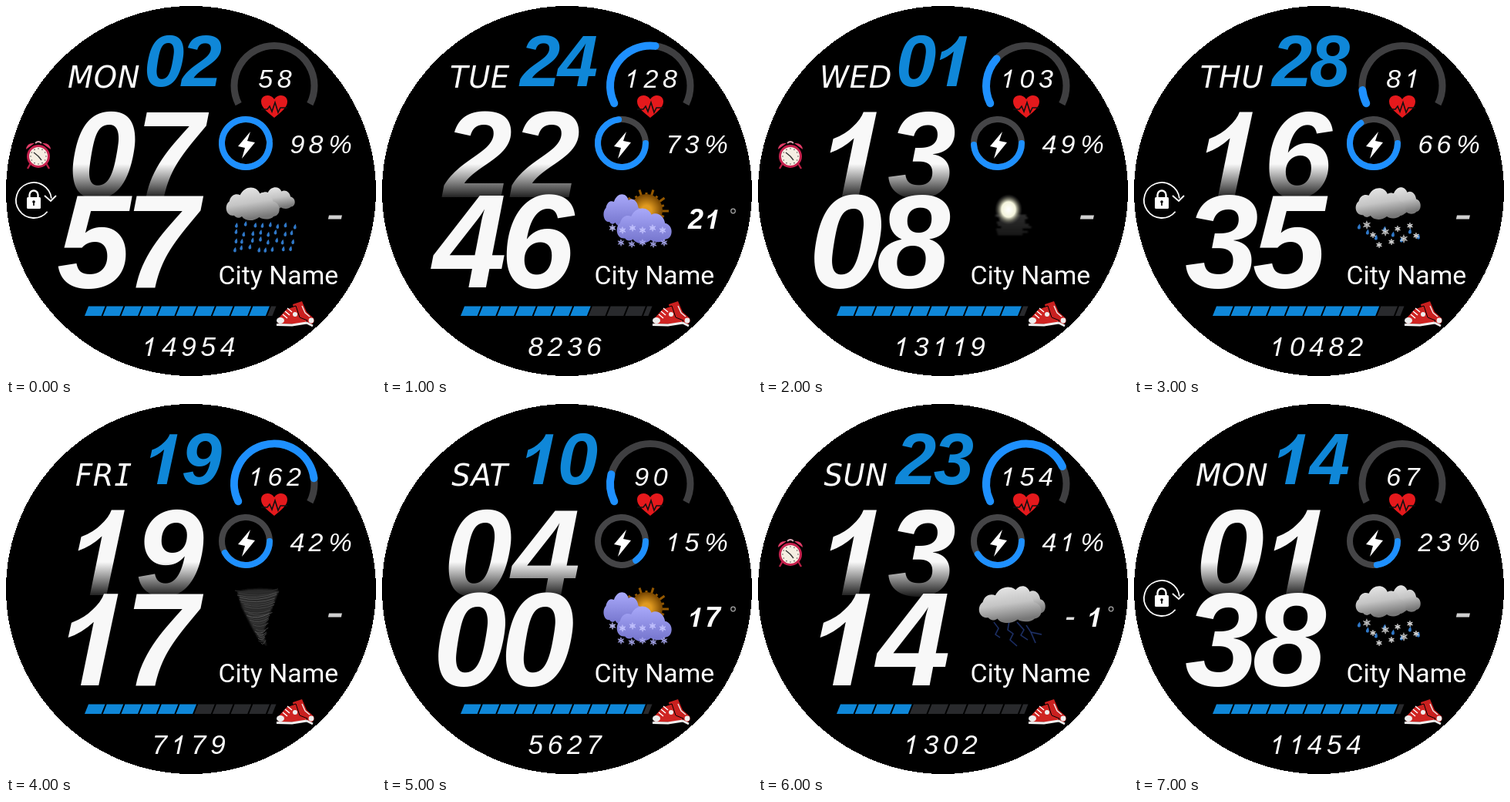
Recreate the animation shown at these times as an HTML page. Size 480 by 480 pixels, loop 8 s.

```html
<!DOCTYPE html>
<html lang="en">
<head>
<meta charset="utf-8">
<title>Watch face</title>
<style>
  html, body { margin: 0; width: 100%; height: 100%; overflow: hidden; background: #fff; }
  svg { display: block; width: 480px; height: 480px; }
  text { fill: #fff; white-space: pre; }
  .num { font-family: "Liberation Sans", Arial, sans-serif; font-style: italic; }
  .bold { font-weight: bold; }
  .day { font: italic 38.5px "DejaVu Sans", Verdana, sans-serif; letter-spacing: .6px; text-anchor: middle; }
  .serif { font-family: "DejaVu Sans Mono", monospace; }
  .city { font: 33.8px Roboto, sans-serif; }
</style>
</head>
<body>
<svg viewBox="0 0 480 480" xmlns="http://www.w3.org/2000/svg">
  <defs>
    <linearGradient id="fade" gradientUnits="userSpaceOnUse" x1="0" y1="205" x2="0" y2="251">
      <stop offset="0" stop-color="#f8f8f8"/><stop offset="1" stop-color="#141414"/>
    </linearGradient>
    <linearGradient id="cloud" x1="0" y1="0" x2=".25" y2="1">
      <stop offset="0" stop-color="#ececec"/><stop offset=".55" stop-color="#c4c4c4"/><stop offset="1" stop-color="#777"/>
    </linearGradient>
    <linearGradient id="violet" x1="0" y1="0" x2="0" y2="1">
      <stop offset="0" stop-color="#a9a9fa"/><stop offset="1" stop-color="#7474cc"/>
    </linearGradient>
    <radialGradient id="sun"><stop offset=".3" stop-color="#e09a20"/><stop offset="1" stop-color="#754400"/></radialGradient>
    <radialGradient id="moon">
      <stop offset="0" stop-color="#fff"/><stop offset=".5" stop-color="#f4f4dc"/>
      <stop offset=".72" stop-color="#8e8e7c" stop-opacity=".7"/><stop offset="1" stop-color="#444" stop-opacity="0"/>
    </radialGradient>
    <filter id="soft" x="-20%" y="-20%" width="140%" height="140%"><feGaussianBlur stdDeviation="1"/></filter>
  </defs>
  <circle cx="240" cy="240" r="240" shape-rendering="crispEdges"/>
  <g id="face"></g>
  <g id="fixed">
    <path d="M348 145C340 138 331 132 331 124C331 115 343 113 348 121C353 113 365 115 365 124C365 132 356 138 348 145Z" fill="#e5191c"/>
    <path d="M331 134H339L342 130L345 137L349 125L353 138L356 132H365" fill="none" stroke="#111" stroke-width="1.6"/>
    <path d="M317 163L301 182L310 184L306 198L323 177L313 175Z" fill="#fff"/>
    <text class="city" x="275.5" y="361">City Name</text>
    <g stroke-linejoin="round" fill="none">
      <path d="M372 387L384 383L390 397L399 405Q401 411 396 413L382 405L374 397Z" fill="#c9201f"/>
      <path d="M374 399L384 408L398 415" stroke="#eee" stroke-width="2.6"/>
      <circle cx="396" cy="408" r="3.4" fill="#eee"/>
      <path d="M384 389L388 398L394 403" stroke="#eee" stroke-width="1.4"/>
      <path d="M364 393L376 389L381 404L391 408L388 413H356Q350 412 353 405Z" fill="#cf2422" stroke="#000"/>
      <path d="M351 413.5L371 414L390 411" stroke="#f2f2f2" stroke-width="3"/>
      <ellipse cx="356" cy="408" rx="5" ry="4" fill="#eee"/>
      <path d="M359 400L365 405M362 396L368 401M365 392L371 397" stroke="#fff" stroke-width="1.5"/>
      <circle cx="375" cy="400" r="3" fill="#eee"/>
    </g>
  </g>
</svg>
<script>
const BLUE = '#0f87d8', RING = '#1e90ff';
const KEYS = ['day', 'date', 'hour', 'min', 'pulse', 'power', 'steps', 'bars', 'sky', 'temp', 'alarm', 'lock'];
const STATES = [
  ['MON', '02', '07', '57', 58, 98, 14954, 10, 'rain', '', 1, 1],
  ['TUE', '24', '22', '46', 128, 73, 8236, 7, 'sunSnow', '21', 0, 0],
  ['WED', '01', '13', '08', 103, 49, 13119, 10, 'moon', '', 1, 0],
  ['THU', '28', '16', '35', 81, 66, 10482, 9, 'sleet', '', 0, 1],
  ['FRI', '19', '19', '17', 162, 42, 7179, 6, 'tornado', '', 0, 0],
  ['SAT', '10', '04', '00', 90, 15, 5627, 10, 'sunSnow', '17', 0, 0],
  ['SUN', '23', '13', '14', 154, 41, 1302, 4, 'storm', '-1', 1, 0],
  ['MON', '14', '01', '38', 67, 23, 11454, 10, 'sleet', '', 0, 1]
].map(row => Object.fromEntries(KEYS.map((k, i) => [k, row[i]])));

const list = (n, fn) => Array.from({ length: n }, (_, i) => fn(i)).join('');
const path = (d, stroke, width, extra = '') =>
  `<path d="${d}" fill="none" stroke="${stroke}" stroke-width="${width}" ${extra}/>`;
const ball = (x, y, rx, ry = rx, fill = '#fff') =>
  `<ellipse cx="${x}" cy="${y}" rx="${rx}" ry="${ry}" fill="${fill}"/>`;

// Footless figure one, in em units with y up
const ONE = {
  bold: 'M.18,0L.278,.478Q.19,.395 .085,.36L.11,.473Q.21,.51 .268,.57Q.335,.63 .355,.69L.462,.69L.315,0Z',
  plain: 'M.195,0L.305,.53Q.22,.455 .12,.42L.138,.505Q.28,.57 .375,.69L.428,.69L.28,0Z'
};

// Digits stay text; each 1 keeps its place there and is drawn as a shape
function num(value, x, y, size, gap, { bold = false, fill = '#fff', mid = false } = {}) {
  const chars = [...String(value)], step = .556 * size + gap;
  if (mid) x -= (chars.length * step - gap) / 2;
  const one = i => ONE[bold ? 'bold' : 'plain'].replace(/([\d.]+),([\d.]+)/g,
    (_, a, b) => `${x + i * step + a * size},${y - b * size}`);
  return `<text class="num${bold ? ' bold' : ''}" x="${x}" y="${y}" font-size="${size}" letter-spacing="${gap}" style="fill:${fill}">` +
    chars.map(c => c === '1' ? '<tspan fill="none">1</tspan>' : c).join('') + '</text>' +
    chars.map((c, i) => c === '1' ? `<path d="${one(i)}" fill="${fill}"/>` : '').join('');
}

function arc(cx, cy, r, from, sweep, color, width, cap = 'butt') {
  const pt = a => [cx + r * Math.cos(a * Math.PI / 180), cy + r * Math.sin(a * Math.PI / 180)].map(v => v.toFixed(2));
  return path(`M${pt(from)}A${r} ${r} 0 ${sweep > 180 ? 1 : 0} 1 ${pt(from + sweep)}`, color, width, `stroke-linecap="${cap}"`);
}

function random(seed) {
  return () => (seed = (seed * 16807) % 2147483647) / 2147483647;
}

// Cloud outline in a 90 x 42 box
const cloud = (x, y, w, h, fill = 'url(#cloud)') =>
  `<path transform="translate(${x} ${y}) scale(${w / 90} ${h / 42})" fill="${fill}"
    d="M14 36C0 37-3 23 6 18C9 9 18 8 24 10C32-3 52-2 57 8C66 4 77 9 79 18C93 20 93 36 80 37C74 42 60 41 56 38C46 44 32 43 27 37C22 40 17 39 14 36Z"/>`;

const flake = (x, y, r, color) =>
  path(list(3, i => {
    const a = i * Math.PI / 3 + .5, dx = r * Math.cos(a), dy = r * Math.sin(a);
    return `M${x - dx} ${y - dy}l${2 * dx} ${2 * dy}`;
  }), color, 1.1) + `<circle cx="${x}" cy="${y}" r="${r * .55}" fill="none" stroke="${color}" stroke-width=".8"/>`;

const drop = (x, y, s = 1) =>
  `<path transform="translate(${x} ${y}) rotate(14) scale(${s})" d="M0-4Q5 4 0 4Q-4 3 0-4Z" fill="#2f78c8"/>`;

const SKY = {
  rain() {
    const rnd = random(11);
    return cloud(327, 235, 48, 29) + cloud(285, 235, 70, 43) +
      list(32, i => {
        const row = i >> 3, col = i % 8;
        return drop(299 + col * 10.5 - row * 2 + rnd() * 4, 282 + row * 10 + rnd() * 5, .85);
      });
  },
  sleet() {
    return cloud(324, 235, 48, 36) + cloud(287, 236, 66, 41) +
      list(8, i => drop(292 + i * 11, 286 + i * 7 % 18, .9)) +
      list(9, i => flake(302 + i * 8, 284 + i * 13 % 30, i % 3 ? 4 : 5.2, '#d8d8d8'));
  },
  storm() {
    const bolts = 'M306 283L312 291L308 299L314 303M326 281L324 293L331 298L327 306L336 314M336 283L345 293L341 300L350 306M348 287L354 296L368 299M354 296L360 310';
    return path(bolts, '#0c1840', 2) + path(bolts, '#3d5790', .5) +
      cloud(317, 236, 56, 40) + cloud(286, 237, 82, 47);
  },
  sunSnow() {
    const rays = list(20, i => {
      const a = i * Math.PI / 10, r = i % 2 ? 24 : 29;
      return `M343 266L${343 + r * Math.cos(a)} ${266 + r * Math.sin(a)}`;
    });
    return path(rays, '#945800', 3) + ball(343, 265, 21, 21, 'url(#sun)') +
      cloud(287, 244, 52, 42, 'url(#violet)') + cloud(304, 262, 72, 46, 'url(#violet)') +
      list(6, i => flake(299 + i * 13, 288 + i % 2 * 3, 4.5, '#c5c5ff')) +
      list(5, i => flake(310 + i * 14, 307 + i % 2 * 2, 4.6, '#aaaaf0'));
  },
  moon() {
    const rnd = random(5);
    return `<g filter="url(#soft)">` + list(9, i => {
      const y = 272 + i * 3, x = 308 + rnd() * 8;
      return path(`M${x} ${y}h${32 + rnd() * 12}`, '#777', 2, `opacity="${.55 - i * .03}"`);
    }) + '</g>' + ball(325, 264, 18, 20, 'url(#moon)');
  },
  tornado() {
    const rnd = random(23);
    return `<g filter="url(#soft)"><path d="M300 243Q326 237 354 242L347 260L339 281L334 297L338 314L327 304L318 288L306 264Z" fill="#292929"/></g>` +
      list(24, i => {
        const k = i / 23, w = 25 * (1 - k) ** 1.2 + 3, x = 327 + 6 * k * k + rnd() * 4 - 2, y = 242 + k * 68;
        const g = Math.round(45 + rnd() * 50);
        return path(`M${x - w} ${y}q${w} ${7 - 3 * k} ${2 * w} ${-1 - rnd() * 3}`, `rgb(${g},${g},${g})`, 1);
      });
  }
};

function alarm() {
  return '<g transform="translate(0 1)">' + path('M32 203L28 210M52 203L56 210', '#b82045', 2.4) +
    `<path d="M26 185Q27 176 37 177ZM58 185Q57 176 47 177Z" fill="#e23b67"/>` +
    path('M38 177Q42 173 46 177', '#d9a3b0', 1.8) +
    ball(42, 194, 15, 15, '#c6204d') + ball(42, 194, 12, 12, '#f5eee2') +
    path('M42 194L36 189M42 194L46 199', '#333', 1.4) +
    list(12, i => {
      const a = i * Math.PI / 6;
      return ball(42 + 10 * Math.cos(a), 194 + 10 * Math.sin(a), .8, .8, '#555');
    }) + '</g>';
}

function lock() {
  return arc(36, 252, 23, 40, 314, '#fff', 1.8) + path('M50 246L58 253L65 246', '#fff', 1.8) +
    '<rect x="27" y="248" width="18" height="15" rx="1.5" fill="#fff"/>' +
    path('M30.5 249V245A5.5 5.5 0 0 1 41.5 245V249', '#fff', 2.4) +
    ball(36, 254, 1.8, 1.8, '#000') + path('M36 254V259', '#000', 1.6);
}

function bar(filled) {
  const cell = (x, w, fill) => `<path d="M${x + 5} 389.5h${w}l-5 12.5h${-w}Z" fill="${fill}"/>`;
  return list(10, i => cell(102 + i * 23.7, 21.6, i < filled ? BLUE : '#292a2d')) + cell(339, 6.5, '#292a2d');
}

function temperature(t) {
  if (!t) return '<path d="M419 271.5h17l-1.2 5h-17Z" fill="#d0d0d0"/>';
  const minus = t < 0;
  return (minus ? '<path d="M400.5 276.5h10l-.8 3.5h-10Z" fill="#ddd"/>' : '') +
    num(Math.abs(t), minus ? 427 : 397, 289, 36, 2, { bold: true }) +
    `<circle cx="${minus ? 458 : 455.5}" cy="266" r="2.8" fill="none" stroke="#aaa" stroke-width="1.2"/>`;
}

function draw(s) {
  const beat = Math.max(0, (s.pulse - 72) * 2.2);
  return `<text class="day" x="127" y="106">${s.day.replace('I', '<tspan class="serif">I</tspan>')}</text>` +
    num(s.date, 179, 104, 94, -3.5, { bold: true, fill: BLUE }) +
    num(s.hour, 80, 248, 160, -1, { bold: true, fill: 'url(#fade)' }) +
    num(s.min, 66, 365, 172, -8, { bold: true, fill: '#f8f8f8' }) +
    arc(348, 103.5, 52, 153, 234, '#3f3f41', 9) +
    (beat ? arc(348, 103.5, 52, 154, beat, RING, 10, 'round') : '') +
    num(s.pulse, 349, 106, 34, 5.5, { mid: true }) +
    arc(311, 178, 31, 0, 359.9, '#454547', 8) +
    arc(311, 178, 31, 0, s.power * 3.6, RING, 8, 'round') +
    num(s.power, 368.5, 191, 34, 5) + num('%', 418.5, 191, 34, 0) +
    SKY[s.sky]() + temperature(s.temp) + bar(s.bars) +
    num(s.steps, 237, 454, 35, 5.8, { mid: true }) +
    (s.alarm ? alarm() : '') + (s.lock ? lock() : '');
}

const face = document.getElementById('face');
const start = performance.now();
let shown = -1;
function tick() {
  const i = Math.floor((performance.now() - start) / 1000) % STATES.length;
  if (i !== shown) face.innerHTML = draw(STATES[shown = i]);
  requestAnimationFrame(tick);
}
tick();
</script>
</body>
</html>
```
